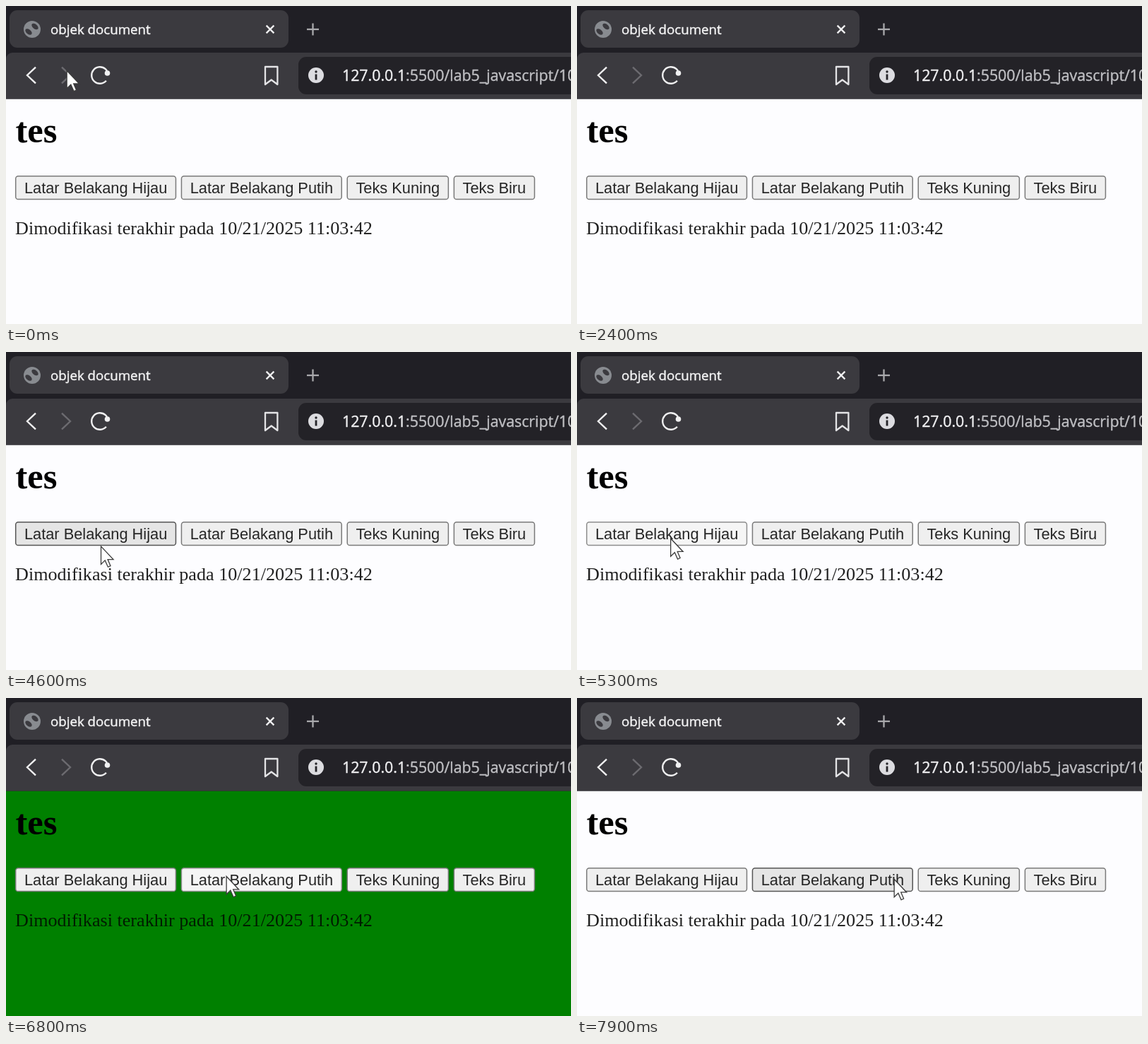
These frames come from a looping animation (800x450 px, 8000 ms). An HTML page with a canvas:

```html
<!DOCTYPE html>
<html lang="id">
<head>
<meta charset="utf-8">
<title>objek document</title>
<style>
html, body { margin: 0; width: 100%; height: 100%; overflow: hidden; background: #fdfdff; }
canvas { display: block; }
</style>
</head>
<body>
<canvas id="stage" width="800" height="450"></canvas>
<script>
const ctx = document.getElementById('stage').getContext('2d');
const LOOP = 8000, STEP = 100;
const W = 800, H = 450, BAR_END = 131.6;
const TAU = Math.PI * 2;

const UI = '"Open Sans", "Noto Sans", sans-serif';
const BUTTON_FONT = '21.8px "Liberation Sans", Arial, sans-serif';
const SERIF = '"Liberation Serif", "Times New Roman", serif';
const DARK = '#201f25', PANEL = '#3b3a3f', FIELD = '#232227';
const LIGHT = '#f0f0f1', DIM = '#6c6b70';

// The pointer glides to each stop in `glide` ms; a stop without a place hides it.
const stops = [
  { at: 0, x: 85.5, y: 90.5 },
  { at: 100, x: 718, y: 293 },
  { at: 200 },
  { at: 1900, x: 742, y: 416 },
  { at: 2000, x: 737, y: 408 },
  { at: 2300, x: 718, y: 428 },
  { at: 2400 },
  { at: 4200, x: 150, y: 370 },
  { at: 4200, x: 132, y: 263, glide: 500 },
  { at: 6000, x: 311.5, y: 251.5, glide: 500 },
  { at: 7700, x: 448.5, y: 255.5, glide: 200 }
];

const clicks = [{ down: 5200, up: 5400 }, { down: 6700, up: 6900 }];
const isPressed = t => clicks.some(c => t >= c.down && t < c.up);
const isGreen = t => t >= clicks[0].up && t < clicks[1].up;

const smooth = u => u * u * (3 - 2 * u);

function pointerAt(t) {
  const i = stops.findLastIndex(s => s.at <= t);
  const to = stops[i];
  if (to.x === undefined) return null;
  if (!to.glide) return to;
  const from = stops[i - 1];
  const u = smooth(Math.min(1, (t - to.at) / to.glide));
  return { x: from.x + (to.x - from.x) * u, y: from.y + (to.y - from.y) * u };
}

// Buttons follow each other like inline boxes sized by their labels.
function layButtons(labels) {
  let x = 13;
  ctx.font = BUTTON_FONT;
  return labels.map(label => {
    const b = { label, x, y: 240, w: ctx.measureText(label).width + 25.8, h: 34.2 };
    x += b.w + 6.6;
    return b;
  });
}
const buttons = layButtons(['Latar Belakang Hijau', 'Latar Belakang Putih', 'Teks Kuning', 'Teks Biru']);

const inside = (p, b) => p && p.x >= b.x && p.x <= b.x + b.w && p.y >= b.y && p.y <= b.y + b.h;

function box(x, y, w, h, r, fill) {
  ctx.beginPath();
  ctx.roundRect(x, y, w, h, r);
  ctx.fillStyle = fill;
  ctx.fill();
}

function disc(x, y, r, fill, ry = r, turn = 0) {
  ctx.beginPath();
  ctx.ellipse(x, y, r, ry, turn, 0, TAU);
  ctx.fillStyle = fill;
  ctx.fill();
}

function trace(points) {
  ctx.beginPath();
  points.forEach(([x, y]) => ctx.lineTo(x, y));
}

function stroke(color, width) {
  ctx.strokeStyle = color;
  ctx.lineWidth = width;
  ctx.stroke();
}

function text(str, x, y, font, color, weight = 0) {
  ctx.font = font;
  ctx.fillStyle = color;
  ctx.fillText(str, x, y);
  if (weight) {
    ctx.strokeStyle = color;
    ctx.lineWidth = weight;
    ctx.strokeText(str, x, y);
  }
  return ctx.measureText(str).width;
}

// Four arms around a centre: a plus, or a cross when turned.
function cross(x, y, arm, turn, color) {
  for (const a of [turn, turn + TAU / 4]) {
    const dx = arm * Math.cos(a), dy = arm * Math.sin(a);
    trace([[x - dx, y - dy], [x + dx, y + dy]]);
    stroke(color, 2.3);
  }
}

// Points left for side -1 and right for side 1.
function chevron(x, y, side, color) {
  trace([[x - 6 * side, y - 11.3], [x + 6 * side, y], [x - 6 * side, y + 11.3]]);
  stroke(color, 2.4);
}

function globe(x, y) {
  disc(x, y, 12, '#888b90');
  disc(x - 5, y + 3.5, 5.5, PANEL, 3.2, 0.7);
  disc(x + 4, y - 4, 5.5, PANEL, 3.2, 0.7);
}

function bookmark(x, y, w, h) {
  trace([[x, y], [x + w, y], [x + w, y + h], [x + w / 2, y + h - 6.5], [x, y + h]]);
  ctx.closePath();
  ctx.lineJoin = 'round';
  stroke('#e4e4e6', 2.3);
  ctx.lineJoin = 'miter';
}

function reload(x, y) {
  ctx.beginPath();
  ctx.arc(x, y, 11.8, 0.72, TAU - 0.55);
  stroke(LIGHT, 2.4);
  disc(x + 10.5, y - 3, 3.8, LIGHT);
}

function info(x, y) {
  disc(x, y, 11, '#dcdce0');
  disc(x, y - 5, 1.7, FIELD);
  box(x - 1.4, y - 1.5, 2.8, 8, 0, FIELD);
}

function browserBar() {
  box(0, 0, W, BAR_END, 0, DARK);
  box(5, 6, 395, 53, 11, PANEL);
  globe(37, 33);
  text('objek document', 63, 40, '18.7px ' + UI, '#f3f3f4', 0.45);
  cross(374, 33, 7.6, TAU / 8, LIGHT);
  cross(434.5, 33, 8.5, 0, '#a9a9ac');

  box(0, 66, W, BAR_END - 66, [9, 0, 0, 0], PANEL);
  chevron(36, 98, -1, LIGHT);
  chevron(85, 98, 1, DIM);
  reload(133, 98);
  bookmark(367, 86, 17.4, 25);
  box(414, 72, W - 400, 53, 11, FIELD);
  info(439, 98);
  const font = '21.3px ' + UI;
  const host = '127.0.0.1';
  const w = text(host, 476, 106, font, '#f1f1f3', 0.4);
  text(':5500/lab5_javascript/10', 476 + w, 106, font, '#c0c0c4', 0.4);
}

function button(b, hover, pressed) {
  const [fill, edge] = !hover ? ['#efefef', '#7a7a7a']
    : pressed ? ['#f5f5f5', '#8d8d8d'] : ['#e5e5e5', '#555'];
  box(b.x + 0.7, b.y + 0.7, b.w - 1.4, b.h - 1.4, 3.6, fill);
  stroke(edge, 1.5);
  text(b.label, b.x + 12.9, 265, BUTTON_FONT, '#262626');
}

function pointer({ x, y }) {
  const k = 1.62;
  const shape = [[0.4, 0.6], [0.4, 16.2], [3.9, 12.8], [6.5, 18.6], [8.7, 17.6], [6.3, 12], [11.2, 12]];
  trace(shape.map(([a, b]) => [x + a * k, y + b * k]));
  ctx.closePath();
  ctx.fillStyle = '#fff';
  ctx.fill();
  stroke('#3c3c3c', 1.3);
}

function draw(t) {
  const pos = pointerAt(t);
  box(0, 0, W, H, 0, isGreen(t) ? '#008000' : '#fdfdff');
  browserBar();
  text('tes', 13.5, 193, 'bold 50.5px ' + SERIF, '#000');
  buttons.forEach(b => button(b, inside(pos, b), isPressed(t)));
  text('Dimodifikasi terakhir pada 10/21/2025 11:03:42', 13, 323, '26.15px ' + SERIF,
    isGreen(t) ? '#001c00' : '#202020');
  if (pos) pointer(pos);
}

const begin = performance.now();
function tick() {
  const t = (performance.now() - begin) % LOOP;
  draw(Math.floor(t / STEP) * STEP);
  requestAnimationFrame(tick);
}
tick();
</script>
</body>
</html>
```
